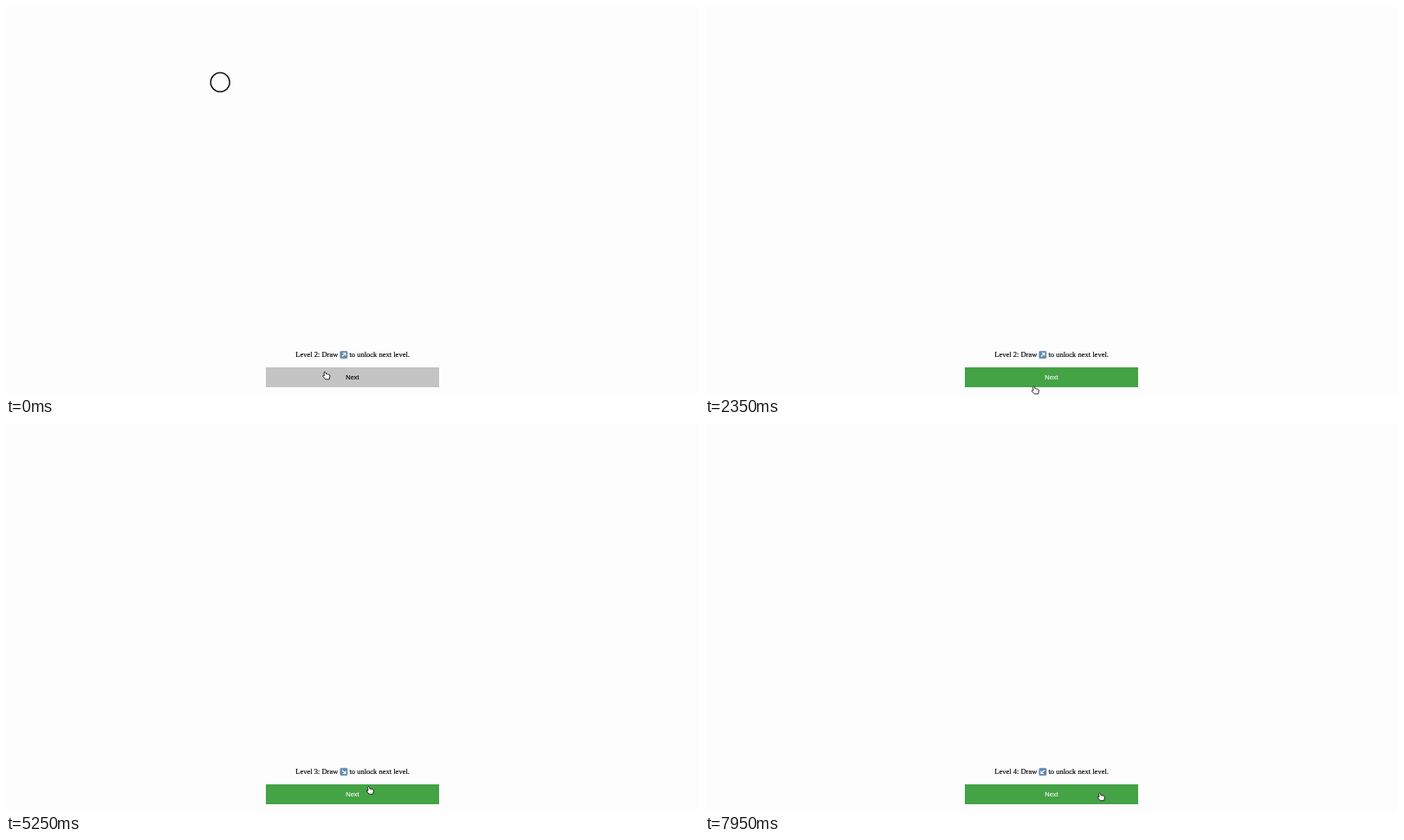
Write an HTML page that moves like this. It is 800 px wide and 450 px high and loops after 8000 ms.

```html
<!DOCTYPE html>
<html lang="en">
<head>
<meta charset="utf-8">
<title>Draw to unlock</title>
<style>
  html, body { margin: 0; width: 100%; height: 100%; overflow: hidden; background: #fdfdfd; }
  svg { display: block; width: 100%; height: 100%; }
  .hint { font: 8.53px "Liberation Serif", serif; stroke: #000; stroke-width: .15px; }
  #label { font: 7.47px "Liberation Sans", sans-serif; text-anchor: middle; stroke: currentColor; stroke-width: .12px; }
</style>
</head>
<body>
<svg viewBox="0 0 800 450">
  <line id="stroke" stroke="#000" stroke-width="3" stroke-linecap="round"/>
  <circle id="dot" r="11" stroke="#000" stroke-width="1.3"/>
  <text id="hint" class="hint" x="334.2" y="406.4"></text>
  <text class="hint" x="396.4" y="406.4">to unlock next level.</text>
  <rect x="385.7" y="399.3" width="8.4" height="8.4" rx="1.3" fill="#5d87ae" stroke="#8a9bac" stroke-width=".5"/>
  <path id="sign" d="M-2 2L1.8-1.8M-1.2-2H2V1.2" fill="none" stroke="#fff" stroke-width="1.1"/>
  <rect id="button" x="300" y="418" width="200" height="23"/>
  <text id="label" x="400" y="432.3">Next</text>
  <g id="cursor">
    <path id="arrow" d="M0 0V8L1.9 6.4 3 9 4.2 8.5 3.1 6H5.6Z" stroke="#fff" stroke-width=".5"/>
    <path id="hand" fill="#fff" stroke="#000" stroke-width=".8" stroke-linejoin="round"
      d="M-1.4 .9Q-.3-.6 .6 .9L1.1 2.8Q2.2 2.2 2.8 3.1Q4.2 2.7 4.5 3.7Q5.5 3.6 5.4 5L4.7 8.8H.3L-2.7 5.5Q-3.2 4-1 4.8Z"/>
  </g>
</svg>
<script>
const LOOP = 8000, STEP = 50, HOME = [368.5, 423];

// The cursor leaves the button, grabs the dot, drags to an end point and goes back to a spot on the button.
const levels = [
  { start: 0, leave: 50, release: 1740, back: 2050, dot: [247.2, 88.2], grab: [247, 92], end: [324, 22], spot: [380, 440] },
  { start: 2500, leave: 2850, release: 4490, back: 5250, dot: [435, 132], grab: [435, 124], end: [480, 173], spot: [419, 420.5] },
  { start: 5400, leave: 5850, release: 7390, back: 7900, dot: [598, 318], grab: [597, 314], end: [545, 367], spot: [456, 428] }
];

const $ = id => document.getElementById(id);
const set = (id, attrs) => {
  for (const key in attrs) $(id).setAttribute(key, attrs[key]);
};
const show = (id, on) => set(id, { visibility: on ? "visible" : "hidden" });
const progress = (t, from, to) => Math.max(0, Math.min(1, (t - from) / (to - from)));

function glide(a, b, t, from, to) {
  const u = progress(t, from, to), e = u * u * (3 - 2 * u);
  return a.map((v, i) => v + (b[i] - v) * e);
}

function draw(t) {
  const index = levels.findLastIndex(l => l.start <= t);
  const { leave, release, back, dot, grab, end, spot } = levels[index];
  const home = index ? levels[index - 1].spot : HOME;
  const hover = leave + 610, press = leave + 810, drag = leave + 1000;
  const open = t >= release;

  const [x, y] = open ? glide(end, spot, t, release, back)
    : t >= drag ? glide(grab, end, t, drag, release - 150)
    : glide(home, grab, t, leave, leave + 700);

  $("hint").textContent = `Level ${index + 2}: Draw`;
  set("sign", { transform: `translate(389.9 403.5) rotate(${index * 90})` });
  set("button", { fill: open ? "#43a345" : "#c4c4c4" });
  set("label", { fill: open ? "#fff" : "#000", color: open ? "#fff" : "#000" });

  const gray = 253 - 50 * progress(t, hover, hover + 100) - 87 * progress(t, press, press + 100);
  set("dot", { cx: dot[0], cy: dot[1], fill: `rgb(${gray},${gray},${gray})` });
  show("dot", !open);

  set("stroke", { x1: grab[0], y1: grab[1], x2: x, y2: y });
  show("stroke", t > drag && !open);

  const onButton = x >= 300 && x <= 500 && y >= 418 && y <= 441;
  set("cursor", { transform: `translate(${x} ${y})` });
  show("hand", onButton);
  show("arrow", !onButton);
}

const begin = performance.now();
function tick() {
  const t = (performance.now() - begin) % LOOP;
  draw(Math.floor(t / STEP) * STEP);
  requestAnimationFrame(tick);
}
tick();
</script>
</body>
</html>
```
